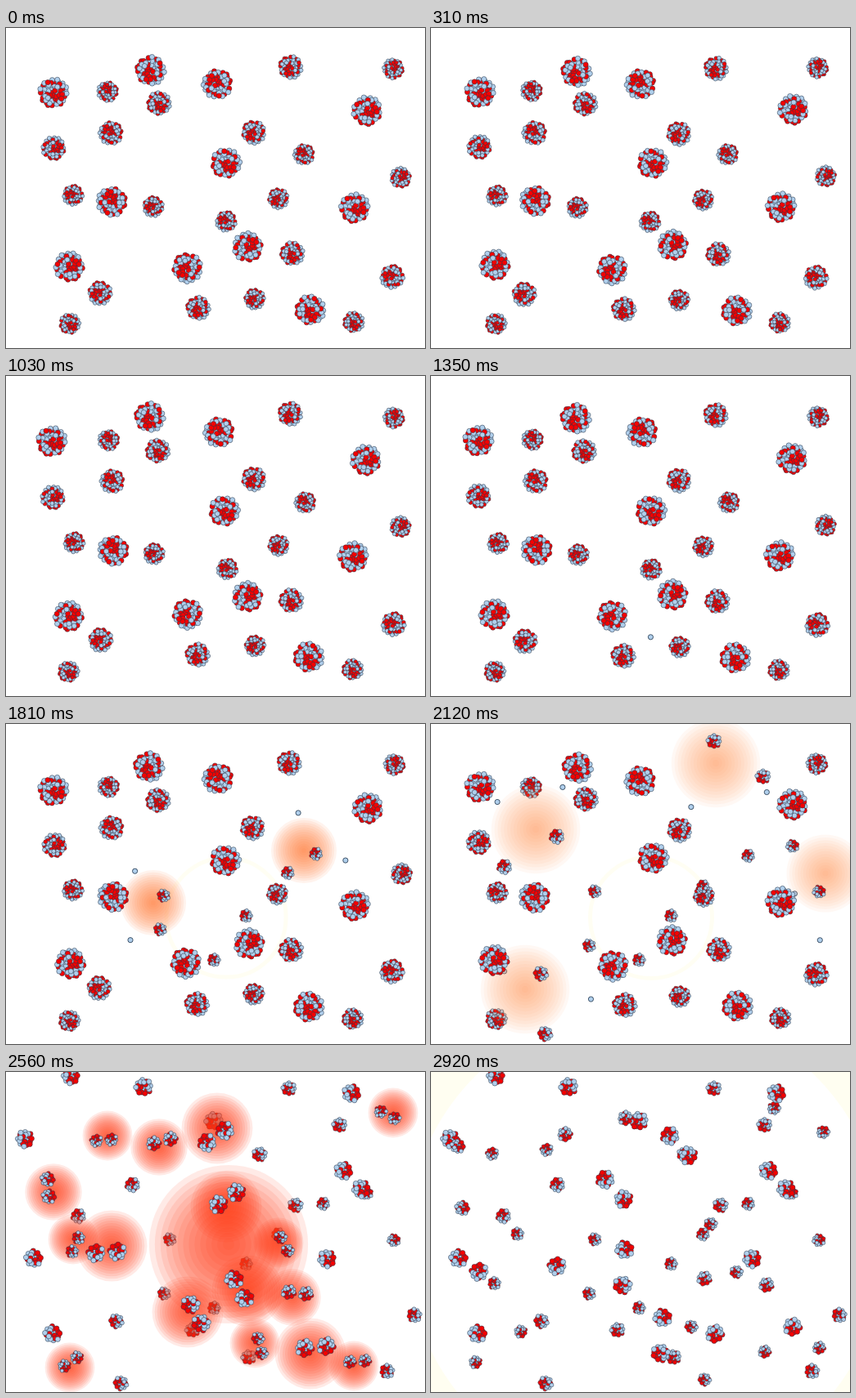
These frames come from a looping animation (512 by 392 pixels, 3.14 s). An HTML page with a canvas:

```html
<!DOCTYPE html>
<html lang="en">
<head>
<meta charset="utf-8">
<title>Chain reaction</title>
<style>
html, body { margin: 0; width: 100%; height: 100%; overflow: hidden; background: #fff; }
canvas { display: block; width: 512px; height: 392px; }
</style>
</head>
<body>
<canvas id="stage" width="512" height="392"></canvas>
<script>
const ctx = document.getElementById('stage').getContext('2d');
const LOOP = 3140, END = 2920;
const FIRST = 1465, STEP = 265;      // first fission, time between generations
const FLIGHT = 188, SPREAD = 130;    // neutron and fragment travel times
const TAU = Math.PI * 2, GOLDEN = Math.PI * (3 - Math.sqrt(5));
const BLUE = '#b0cfec', RED = '#f40000';
const RADIUS = { S: 14, M: 16, L: 20 };

// Binary tree, level by level: x, y, tilt in degrees. Nucleus i is hit from (i - 1) >> 1.
const places = [
  [269, 237, -5],
  [180, 219, -35], [364, 155, 15],
  [128, 129, 19], [115, 325, -45], [348, 48, 265], [482, 183, 109],
  [58, 79, 175], [177, 52, 255], [77, 292, 125], [235, 343, 255],
  [441, 101, 145], [303, 128, -76], [426, 220, 165], [472, 305, -15],
  [124, 78, 45], [58, 147, 135], [187, 92, 214], [258, 69, 15],
  [82, 205, -16], [129, 213, 45], [222, 294, -70], [304, 332, -55],
  [473, 50, 75], [333, 209, -69], [269, 165, 195], [295, 268, 110],
  [350, 276, 235], [425, 360, 225], [372, 345, 224], [78, 362, 195]
];
const sizes = 'SSSMMMSLLLMLMLMSMMLSLLSSSLLMSLS';

let seed = 11;
function rand() {
  seed = (seed * 16807) % 2147483647;
  return seed / 2147483647;
}
const mix = (a, b, k) => a + (b - a) * k;
const clamp = v => Math.max(0, Math.min(1, v));

// Evenly packed balls in a unit disc, overlapping in random order.
function cluster(count, size) {
  const balls = [];
  for (let i = 0; i < count; i++) {
    const d = (1 - size) * Math.pow((i + 0.5) / count, 0.46);
    const a = i * GOLDEN + (rand() - 0.5) * 0.2;
    const fill = i % 5 === 0 || i % 5 === 2 || rand() < 0.1 ? RED : BLUE;
    balls.push({ x: d * Math.cos(a), y: d * Math.sin(a), fill, depth: rand() });
  }
  balls.sort((p, q) => p.depth - q.depth);
  return { balls, size };
}
const WHOLE = cluster(66, 0.155), HALF = cluster(25, 0.245);

// Every nucleus is the same figure, scaled and turned; so are its two fragments.
const nuclei = places.map(([x, y, deg], i) => {
  const r = RADIUS[sizes[i]], tilt = deg * TAU / 360;
  const part = (reach, turn) => ({
    x: x + r * reach * Math.cos(tilt + turn),
    y: y + r * reach * Math.sin(tilt + turn)
  });
  const level = Math.floor(Math.log2(i + 1));
  return { x, y, r, tilt, level, time: FIRST + level * STEP, parts: [part(1.74, 0), part(3.86, 1.937)] };
});
const levels = [0, 1, 2, 3, 4].map(k => nuclei.filter(n => n.level === k));

function ball(x, y, r, fill) {
  ctx.beginPath();
  ctx.arc(x, y, r, 0, TAU);
  ctx.fillStyle = fill;
  ctx.fill();
  ctx.stroke();
}

function drawCluster(look, x, y, r, tilt) {
  const c = Math.cos(tilt) * r, s = Math.sin(tilt) * r;
  ctx.strokeStyle = '#2c3a4c';
  ctx.lineWidth = 0.55;
  for (const b of look.balls) {
    ball(x + b.x * c - b.y * s, y + b.x * s + b.y * c, look.size * r, b.fill);
  }
}

// Intact nucleus, trembling along its own axes.
function drawNucleus(n, t) {
  if (t >= n.time) return;
  const u = 0.11 * n.r * Math.sin(Math.PI * t / 225);
  const v = 0.11 * n.r * Math.sin(Math.PI * t / 336);
  const c = Math.cos(n.tilt), s = Math.sin(n.tilt);
  drawCluster(WHOLE, n.x + u * c - v * s, n.y + u * s + v * c, n.r, n.tilt);
}

function neutron(from, to, age) {
  if (age < 0 || age >= FLIGHT) return;
  const k = age / FLIGHT;
  ctx.strokeStyle = '#33475c';
  ctx.lineWidth = 0.9;
  ball(mix(from.x, to.x, k), mix(from.y, to.y, k), 3.1, BLUE);
}

// Banded glow that turns from red to orange to yellow while it fades.
function glow(x, y, r, age) {
  if (age < 0 || age > 260) return;
  const warm = clamp((age - 35) / 45), late = clamp((age - 80) / 180);
  const green = mix(mix(62, 112, warm), 235, late);
  const blue = mix(mix(25, 48, warm), 190, late);
  const alpha = mix(0.105, 0.086, warm) * (1 - late);
  ctx.fillStyle = `rgba(255,${green | 0},${blue | 0},${alpha.toFixed(4)})`;
  for (let i = 14; i > 0; i--) {
    ctx.beginPath();
    ctx.arc(x, y, r * i / 14, 0, TAU);
    ctx.fill();
  }
}

function halo(x, y, r, width, alpha) {
  ctx.beginPath();
  ctx.arc(x, y, r - width / 2, 0, TAU);
  ctx.strokeStyle = `rgba(255,250,200,${alpha.toFixed(3)})`;
  ctx.lineWidth = width;
  ctx.stroke();
}

const blastSize = (r, age) => r * (1 + 0.152 * Math.pow(age, 0.57));

function drawLevel(list, t) {
  const age = t - list[0].time;
  if (age < 0) return;
  const k = clamp(age / SPREAD);
  for (const n of list) glow(n.x, n.y, blastSize(n.r, age), age);
  for (const n of list) {
    for (const p of n.parts) drawCluster(HALF, mix(n.x, p.x, k), mix(n.y, p.y, k), n.r * 0.63, n.tilt);
  }
}

function draw(t) {
  ctx.fillStyle = '#fff';
  ctx.fillRect(0, 0, 512, 392);

  const root = nuclei[0], last = t - levels[4][0].time;
  if (t > root.time && last < 0) {
    const age = t - root.time;
    halo(root.x, root.y, Math.min(77, blastSize(root.r, age) + 2), 5, 0.22 * clamp((age - 180) / 80));
  }

  neutron({ x: 268, y: 376 }, root, t - FIRST + FLIGHT + 2);
  nuclei.forEach((n, i) => {
    if (i === 0) return;
    const from = nuclei[(i - 1) >> 1];
    neutron(from, n, t - from.time);
  });

  const large = n => n.r === RADIUS.L;
  for (const n of nuclei) if (!large(n)) drawNucleus(n, t);
  levels.slice(0, 4).forEach(list => drawLevel(list, t));
  for (const n of nuclei) if (large(n)) drawNucleus(n, t);

  // The final wave merges into one blast that sweeps the whole stage.
  if (last >= 0) {
    const r = 73 + 0.67 * last;
    glow(272, 211, r, last);
    halo(262, 211, r + 30, 75, 0.26 * clamp((last - 150) / 100));
    drawLevel(levels[4], t);
  }
}

const start = performance.now();
function tick() {
  draw(Math.min((performance.now() - start) % LOOP, END));
  requestAnimationFrame(tick);
}
tick();
</script>
</body>
</html>
```
